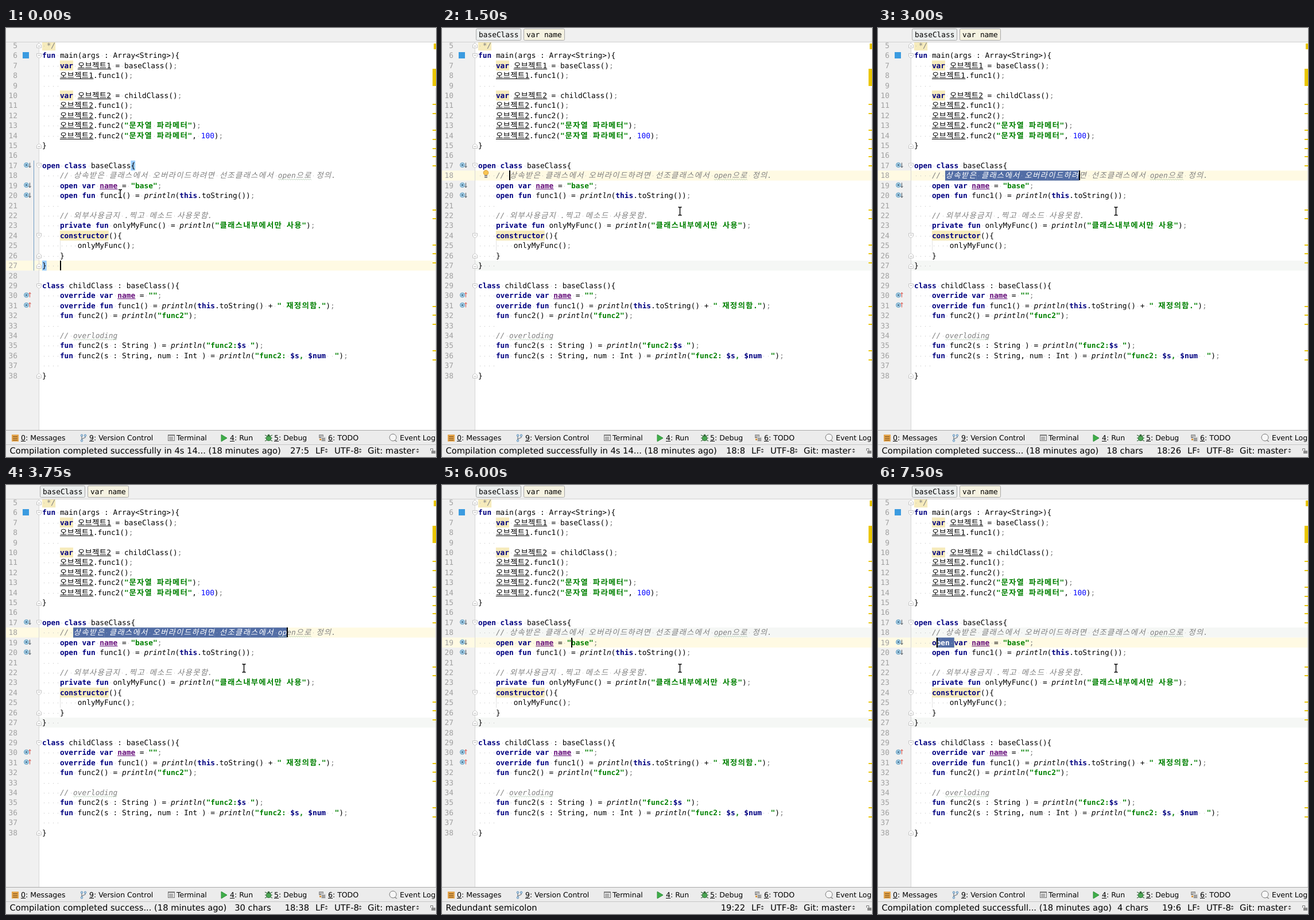
An HTML page with a canvas that plays this animation: 749x747 px, repeating every 8 s.

```html
<!DOCTYPE html>
<html lang="ko">
<head>
<meta charset="utf-8">
<title>Editor</title>
<style>
html, body { margin: 0; width: 100%; height: 100%; overflow: hidden; background: #fff; }
canvas { display: block; }
</style>
</head>
<body>
<canvas id="stage" width="749" height="747"></canvas>
<script>
const ctx = document.getElementById('stage').getContext('2d');
const W = 749, LOOP = 8000;
const LEFT = 63, CELL = 7.72, ROW = 17.42, FIRST = 5;
const MONO = '"DejaVu Sans Mono", monospace';
const SANS = '"DejaVu Sans", sans-serif';
const HANGUL = '"Noto Sans CJK KR", "Noto Sans CJK", sans-serif';

const source = String.raw` */
fun main(args : Array<String>){
    var 오브젝트1 = baseClass();
    오브젝트1.func1();
    
    var 오브젝트2 = childClass();
    오브젝트2.func1();
    오브젝트2.func2();
    오브젝트2.func2("문자열 파라메터");
    오브젝트2.func2("문자열 파라메터", 100);
}

open class baseClass{
    // 상속받은 클래스에서 오버라이드하려면 선조클래스에서 open으로 정의.
    open var name = "base";
    open fun func1() = println(this.toString());
    
    // 외부사용금지 .찍고 메소드 사용못함.
    private fun onlyMyFunc() = println("클래스내부에서만 사용");
    constructor(){
        onlyMyFunc();
    }
}   

class childClass : baseClass(){
    override var name = "";
    override fun func1() = println(this.toString() + " 재정의함.");
    fun func2() = println("func2");
    
    // overloding
    fun func2(s : String ) = println("func2:$s ");
    fun func2(s : String, num : Int ) = println("func2: $s, $num  ");
    
}`.split('\n');

const styles = {
  plain: { color: '#000', font: '' },
  key: { color: '#000080', font: 'bold ' },
  text: { color: '#008000', font: 'bold ' },
  note: { color: '#808080', font: 'italic ' },
  call: { color: '#000', font: 'italic ' },
  num: { color: '#0000ff', font: '' },
  prop: { color: '#660e7a', font: 'bold ', line: true },
  object: { color: '#000', font: '', line: true },
  faint: { color: '#808080', font: '' }
};
const rules = [
  ['note', /^(\/\/.*| \*\/)/],
  ['text', /^"[^"]*"/],
  ['key', /^(fun|var|open|class|private|constructor|override|this)\b/],
  ['call', /^println/],
  ['prop', /^name\b/],
  ['object', /^오브젝트\d/],
  ['num', /^100/],
  ['faint', /^;/],
  ['plain', /^(\w+|.)/]
];

// Splits a line into placed characters; the last entry marks the line end.
function layout(line) {
  const cells = [];
  let x = LEFT, rest = line;
  const add = (word, kind) => {
    for (const ch of word) {
      const wide = ch >= '가' && ch <= '힣';
      const w = !wide ? CELL : styles[kind].font ? 13.58 : 12.6;
      cells.push({ ch, kind, wide, x, w });
      x += w;
    }
  };
  while (rest) {
    const [kind, rule] = rules.find(r => r[1].test(rest));
    const word = rest.match(rule)[0];
    if (kind === 'text') {
      for (const part of word.split(/(\$\w+)/)) add(part, part[0] === '$' ? 'key' : 'text');
    } else add(word, kind);
    rest = rest.slice(word.length);
  }
  cells.push({ ch: '', x, w: 0 });
  return cells;
}
const lines = source.map(layout);
const rowTop = n => 405 + (n - 27) * ROW;
const colX = (n, col) => lines[n - FIRST][col].x;

const DONE = 'Compilation completed success', AGO = '... (18 minutes ago)';
const states = [
  { at: 0, row: 27, col: 4, mouse: [199, 288.5], msg: DONE + 'fully in 4s 14' + AGO, braces: true },
  { at: 750, mouse: [124, 258.5] },
  { at: 1500, row: 18, col: 7, mouse: [414.5, 319], braces: false, crumbs: true, bulb: true, old: [27] },
  { at: 2250, col: 9, sel: [7, 9], bulb: false, msg: DONE + 'f' + AGO },
  { at: 3000, col: 25, sel: [7, 25], msg: DONE + AGO },
  { at: 3750, col: 37, sel: [7, 37] },
  { at: 4500, col: 44, sel: [7, 44] },
  { at: 5250, bulb: true },
  { at: 6000, row: 19, col: 21, sel: null, bulb: false, old: [18, 27], msg: 'Redundant semicolon' },
  { at: 6750, col: 9, msg: DONE + 'fully in 4s 1' + AGO },
  { at: 7500, col: 5, sel: [5, 9], msg: DONE + 'full' + AGO }
];

function rect(x, y, w, h, color) {
  ctx.fillStyle = color;
  ctx.fillRect(x, y, w, h);
}
function path(points, stroke, width = 1, fill = null) {
  ctx.beginPath();
  points.forEach(([x, y], i) => i ? ctx.lineTo(x, y) : ctx.moveTo(x, y));
  if (fill) { ctx.closePath(); ctx.fillStyle = fill; ctx.fill(); }
  if (stroke) { ctx.strokeStyle = stroke; ctx.lineWidth = width; ctx.stroke(); }
}
function disc(x, y, r, fill, stroke) {
  ctx.beginPath();
  ctx.arc(x, y, r, 0, 7);
  if (fill) { ctx.fillStyle = fill; ctx.fill(); }
  if (stroke) { ctx.strokeStyle = stroke; ctx.lineWidth = 1; ctx.stroke(); }
}
function label(s, x, y, font, color = '#000', align = 'left') {
  ctx.font = font;
  ctx.fillStyle = color;
  ctx.textAlign = align;
  ctx.fillText(s, x, y);
  return ctx.measureText(s).width;
}
function wave(x1, x2, y) {
  const pts = [];
  for (let x = x1, i = 0; x <= x2; x += 2, i++) pts.push([x, y + (i % 2 ? 1 : -1)]);
  path(pts, '#a9c6a9', 0.8);
}

function drawLine(n, s) {
  const cells = lines[n - FIRST], base = rowTop(n) + 13.1;
  cells.forEach((c, i) => {
    if (!c.ch) return;
    const picked = s.sel && n === s.row && i >= s.sel[0] && i < s.sel[1];
    if (picked) rect(c.x, rowTop(n), c.w + 0.3, ROW, '#526da5');
    if (c.ch === ' ') {
      rect(Math.round(c.x + 3.4), Math.round(base - 4), 1, 1, picked ? '#a9b8d4' : '#bcbcbc');
      return;
    }
    const st = styles[c.kind];
    const font = st.font + (c.wide ? '13.4px ' + HANGUL : '12.82px ' + MONO);
    label(c.ch, c.x + c.w / 2, base, font, picked ? '#fff' : st.color, 'center');
    if (st.line) rect(c.x, Math.round(base + 1), c.w + 0.3, 1, st.color);
  });
}

function foldMark(n, dir) {
  const y = Math.round(rowTop(n) + 8.7) + 0.5, x = 57.5;
  path([[x - 4, y - 4 * dir], [x + 4, y - 4 * dir], [x + 4, y + dir], [x, y + 4 * dir],
    [x - 4, y + dir], [x - 4, y - 4 * dir]], '#c4c4c4', 1, '#fff');
  path([[x - 2, y - dir], [x + 2, y - dir]], '#b0b0b0');
}

function linkIcon(n, up) {
  const y = rowTop(n) + 7.8, color = up ? '#d9534a' : '#4a5560', d = up ? -1 : 1;
  disc(35.5, y, 4, '#a9cfe6', '#5f9cc0');
  disc(35.5, y, 1.6, '#41708f');
  path([[41.5, y - 4], [41.5, y + 4]], color);
  path([[39.5, y + d * 2], [41.5, y + d * 4.5], [43.5, y + d * 2]], color);
}

function drawGutter(s) {
  for (let n = FIRST; n <= 38; n++)
    label(n, 20, rowTop(n) + 13.1, '12.82px ' + MONO, '#a0a0a0', 'right');
  rect(29, 42, 11, 11, '#3b9be0');
  [17, 19, 20].forEach(n => linkIcon(n, false));
  [30, 31].forEach(n => linkIcon(n, true));
  rect(57, 25, 1, 675, '#d6d6d6');
  if (s.braces) rect(48, rowTop(17), 1, ROW * 11, '#6f9bc4');
  [6, 17, 24, 29].forEach(n => foldMark(n, 1));
  [5, 15, 26, 27, 38].forEach(n => foldMark(n, -1));
}

function drawStripe() {
  rect(748, 104, 1, 596, '#dcdcdc');
  rect(745, 27, 4, 10, '#ebc700');
  rect(743, 71, 6, 30, '#ebc700');
  for (const y of [133, 149, 178, 194, 210, 224, 240, 317, 332, 378, 393, 409, 485, 500, 516, 562, 578])
    rect(743, y - 1, 6, 2, '#ebc700');
}

function drawBulb() {
  disc(76.5, 252, 4.3, '#f8c552', '#d99a36');
  rect(74, 256, 5, 5, '#8b8b8b');
  rect(74, 258, 5, 1, '#d8d8d8');
}

function drawMouse([x, y]) {
  const beam = (color, width) => {
    path([[x - 3, y - 7], [x - 1, y - 7], [x, y - 6], [x + 1, y - 7], [x + 3, y - 7]], color, width);
    path([[x - 3, y + 7], [x - 1, y + 7], [x, y + 6], [x + 1, y + 7], [x + 3, y + 7]], color, width);
    path([[x, y - 6], [x, y + 6]], color, width);
  };
  beam('#fff', 3);
  beam('#000', 1.4);
}

function drawEditor(s) {
  rect(0, 25, W, 675, '#fff');
  rect(0, 25, 57, 675, '#f0f0f0');
  for (const n of s.old || []) rect(58, rowTop(n), W - 58, ROW, '#f5f7f5');
  rect(0, rowTop(s.row), W, ROW, '#fffae3');
  const mark = (n, x, cols, color) => rect(x, rowTop(n), cols * CELL, ROW, color);
  mark(5, LEFT, 3, '#f6ebbc');
  [7, 10].forEach(n => mark(n, colX(n, 4), 3, '#f6ebbc'));
  mark(24, colX(24, 4), 11, '#f6ebbc');
  if (s.braces) {
    mark(17, colX(17, 20), 1, '#99ccff');
    mark(27, LEFT, 1, '#99ccff');
  }
  rect(94, rowTop(25), 1, ROW, '#e2e2e2');
  for (let n = FIRST; n <= 38; n++) drawLine(n, s);
  wave(colX(18, 35), colX(18, 41), rowTop(18) + 15.5);
  wave(colX(34, 7), colX(34, 17), rowTop(34) + 15.5);
  drawGutter(s);
  drawStripe();
  if (s.bulb) drawBulb();
  rect(Math.round(colX(s.row, s.col)), Math.round(rowTop(s.row)), 2, 17, '#000');
}

function crumb(x, w, name, fill) {
  ctx.beginPath();
  ctx.roundRect(x + 0.5, 1.5, w - 1, 20, 2);
  ctx.fillStyle = fill;
  ctx.fill();
  ctx.strokeStyle = '#a8a8a8';
  ctx.lineWidth = 1;
  ctx.stroke();
  [...name].forEach((ch, i) => label(ch, x + 5 + i * CELL, 16, '12.82px ' + MONO));
}
function drawTop(s) {
  rect(0, 0, W, 24, '#f0f0f0');
  rect(0, 24, W, 1, '#d0d0d0');
  if (!s.crumbs) return;
  crumb(59, 79, 'baseClass', '#ebeeee');
  crumb(142, 72, 'var name', '#f5f2e1');
}

function toolIcons() {
  rect(10, 708, 12, 12, '#e3a44c');
  [711, 714, 717].forEach(y => rect(12, y, 8, 1, '#7a4d16'));

  path([[132, 711], [132, 717]], '#6c7680', 1.2);
  path([[132, 716], [138, 713], [138, 711]], '#6c7680', 1.2);
  [[132, 709.5], [132, 718.5], [138, 709.5]].forEach(([x, y]) => disc(x, y, 1.7, '#cfe0ee', '#4f87b5'));

  rect(282, 708, 12, 11, '#777');
  rect(283, 710, 10, 8, '#e9e9e9');
  [712, 714, 716].forEach(y => rect(284, y, 7, 1, '#777'));

  path([[375, 708], [385, 714], [375, 720]], '#2f8f3a', 1, '#3fae49');

  for (const d of [-4, 0, 4]) path([[451, 714 + d * 1.3], [457.5, 714 + d / 2], [464, 714 + d * 1.3]], '#3d6d42', 1.2);
  disc(457.5, 714.5, 4.2, '#4ba653', '#2d7035');
  disc(457.5, 709.5, 2, '#35643a');

  rect(545, 708, 8, 6, '#8d8d8d');
  rect(546, 710, 6, 1, '#fff');
  rect(549, 712, 8, 8, '#d8d8d8');
  [714, 716, 718].forEach(y => rect(550, y, 6, 1, '#666'));
  rect(546, 715, 3, 3, '#d9973e');

  disc(674, 713, 6, '#f7f7f7', '#777');
  path([[677, 718], [681, 720]], '#777', 1.3);
}
function drawTools() {
  rect(0, 700, W, 26, '#ececec');
  rect(0, 700, W, 1, '#a9a9a9');
  rect(0, 725, W, 1, '#c6c6c6');
  toolIcons();
  const font = '12.5px ' + SANS;
  const names = [[26, '0: Messages'], [145, '9: Version Control'], [297, 'Terminal'], [390, '4: Run'],
    [467, '5: Debug'], [561, '6: TODO'], [686, 'Event Log']];
  for (const [x, name] of names) {
    label(name, x, 718, font);
    if (name[1] === ':') rect(x, 719, 8, 1, '#000');
  }
}

function drawStatus(s) {
  rect(0, 726, W, 21, '#ececec');
  const font = '14.7px ' + SANS;
  label(s.msg, 6.5, 741, font);
  const w = label(s.row + ':' + (s.col + 1), 528, 741, font, '#000', 'right');
  if (s.sel) label(s.sel[1] - s.sel[0] + ' chars', 528 - w - 24, 741, font, '#000', 'right');
  for (const [x, name, tip] of [[539, 'LF', 558], [572, 'UTF-8', 617], [630, 'Git: master', 717]]) {
    label(name, x, 741, font);
    path([[tip - 2.5, 735], [tip, 732], [tip + 2.5, 735]], null, 0, '#555');
    path([[tip - 2.5, 737], [tip, 740], [tip + 2.5, 737]], null, 0, '#555');
  }
  path([[739.5, 736], [739.5, 732.5], [743.5, 732.5], [743.5, 736]], '#777');
  rect(741, 736, 7, 5, '#8a8a8a');
}

function frame() {
  const t = performance.now() % LOOP;
  const s = Object.assign({}, ...states.filter(state => state.at <= t));
  ctx.textRendering = 'geometricPrecision';
  drawEditor(s);
  drawTop(s);
  drawTools();
  drawStatus(s);
  drawMouse(s.mouse);
  requestAnimationFrame(frame);
}
frame();
</script>
</body>
</html>
```
